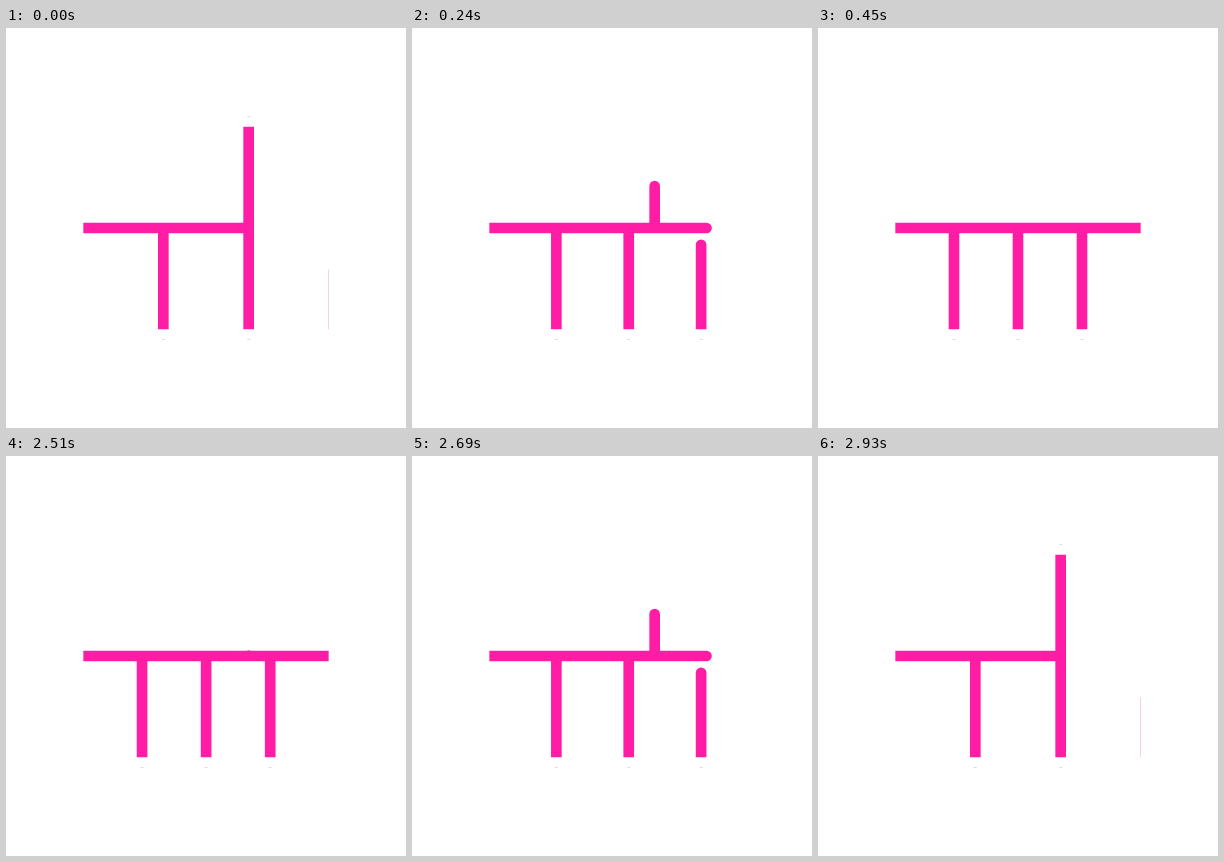
Write an HTML page that moves like this. It is 400 by 400 pixels and loops after 3.96 s.

```html
<!DOCTYPE html>
<html>
<head>
<meta charset="utf-8">
<style>
html, body { margin: 0; height: 100%; overflow: hidden; background: #fff; }
svg { display: block; width: 100%; height: 100%; }
</style>
</head>
<body>
<svg viewBox="-18.75 -18.75 37.5 37.5" fill="none">
  <clipPath id="box"><rect x="-11.5" y="-9.5" width="23" height="19"/></clipPath>
  <g clip-path="url(#box)">
    <path id="bars" stroke="#ff1da5" stroke-width="1" stroke-linecap="round"/>
  </g>
  <path id="tips" stroke="#e0dadd" stroke-width=".094"/>
</svg>
<script>
const LOOP = 3960, STEP = 30, STEPS = 15, BACK = 2480;
const bars = document.getElementById('bars');
const tips = document.getElementById('tips');

// cubic-bezier(.7, 0, .3, 1), solved by bisection
function ease(u) {
  if (u <= 0 || u >= 1) return u <= 0 ? 0 : 1;
  const curve = (s, a, b) => 3 * (1 - s) ** 2 * s * a + 3 * (1 - s) * s * s * b + s ** 3;
  let lo = 0, hi = 1;
  for (let i = 0; i < 30; i++) {
    const mid = (lo + hi) / 2;
    if (curve(mid, .7, .3) < u) lo = mid; else hi = mid;
  }
  return curve(lo, 0, 1);
}

// 0 to 1 in whole steps
const ramp = t => Math.min(1, Math.max(0, Math.floor(t / STEP) / STEPS));

const line = (x1, y1, x2, y2) => `M${x1} ${y1}L${x2} ${y2}`;
const tip = (x, y) => line(x - .14, y, x + .14, y);

function draw(now) {
  const t = now % LOOP;
  const p = ease(t < BACK ? ramp(t) : 1 - ramp(t - BACK));
  const legs = [-4 - 2 * p, 4 - 4 * p, 12 - 6 * p];
  bars.setAttribute('d',
    line(-12, 0, 4 + 8 * p, 0) +
    line(4, 10 * p - 10, 4, 0) +
    legs.map((x, i) => line(x, i == 2 ? 4 - 4 * p : 0, x, 10)).join(''));
  tips.setAttribute('d',
    legs.filter(x => x < 11.5).map(x => tip(x, 10.453)).join('') +
    (p == 0 ? tip(4, -10.453) : ''));
}

const start = performance.now();
function tick() {
  draw(performance.now() - start);
  requestAnimationFrame(tick);
}
tick();
</script>
</body>
</html>
```
